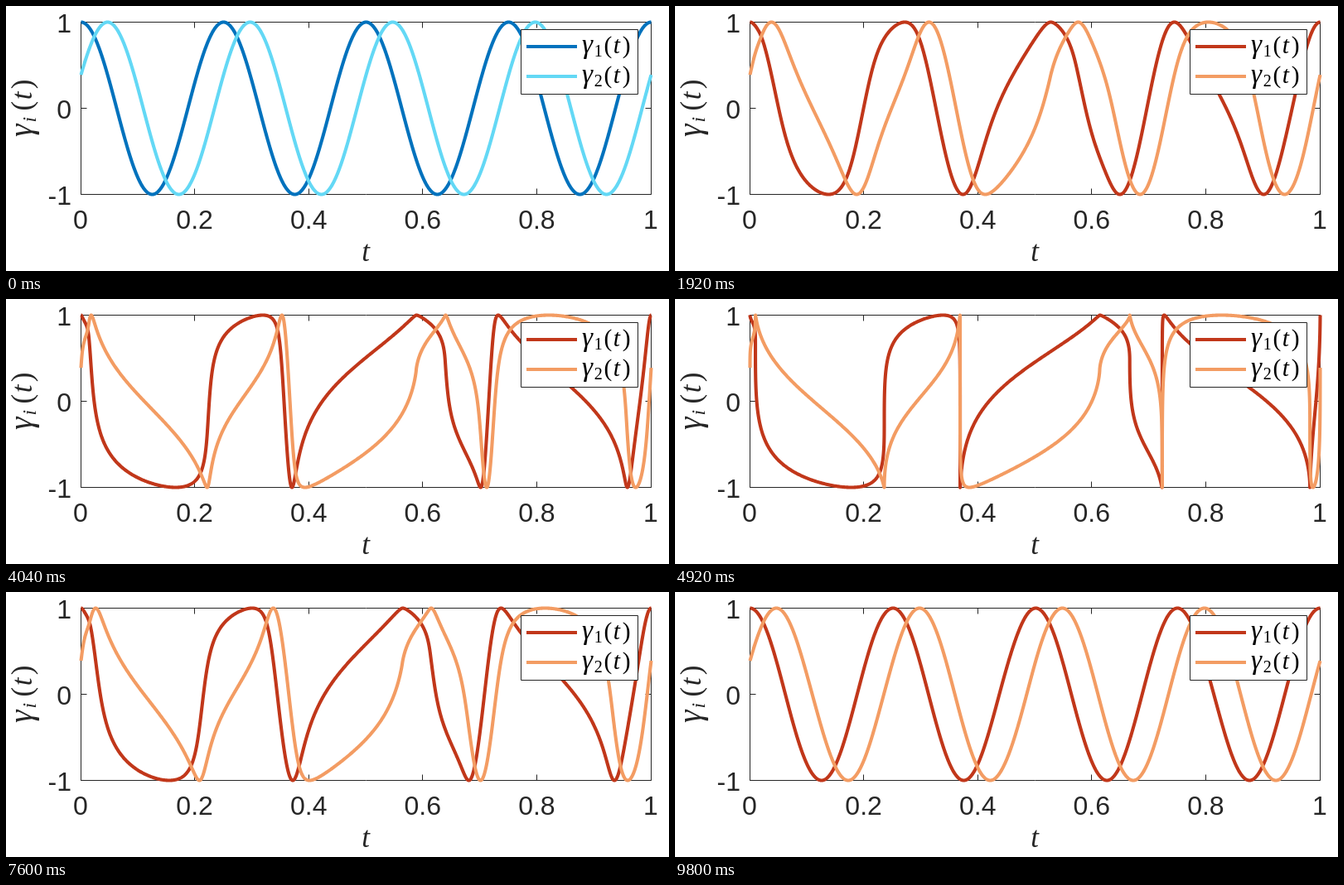
These frames come from a looping animation (800 by 320 pixels, 9840 ms). An HTML page with a canvas:

```html
<!DOCTYPE html>
<html lang="en">
<head>
<meta charset="utf-8">
<title>Time warping of two waves</title>
<style>
  html, body { margin: 0; width: 800px; height: 320px; overflow: hidden; background: #fff; }
  canvas { display: block; }
</style>
</head>
<body>
<canvas id="stage" width="800" height="320"></canvas>
<script>
const ctx = document.getElementById('stage').getContext('2d');
const LOOP = 9840, STEP = 40, HOLD = 1000, LAST = 99;
const BOX = { x: 90.5, y: 19.5, w: 688, h: 208 };
const INK = '#262626';
const BLUE = ['#0072bd', '#63d8f5'];
const RED = ['#c1371a', '#f39c63'];
const SHIFT = 1.172;
const SAMPLES = 2400;
const WEIGHT = 4.1;
const SANS = '"Liberation Sans", Arial, sans-serif';
const SERIF = '"Liberation Serif", "Times New Roman", serif';

// Places where the warped time almost stands still; a higher power is flatter.
const STOPS = [
  { s: 0, t: 0, power: 2.6 },
  { s: 0.036, t: 0.0095, power: 3.05 },
  { s: 0.1775, t: 0.2355, power: 2.5 },
  { s: 0.34, t: 0.3685, power: 5.5 },
  { s: 0.499, t: 0.6133, power: 1.42 },
  { s: 0.543, t: 0.666, power: 2.1 },
  { s: 0.672, t: 0.723, power: 5.9 },
  { s: 0.87, t: 0.982, power: 2.35 },
  { s: 1, t: 1, power: 2.6 }
];

// Full warp: an S-curve from each stop to the next.
function warp(s) {
  const next = Math.max(1, STOPS.findIndex(stop => stop.s >= s));
  const a = STOPS[next - 1], b = STOPS[next];
  const u = (s - a.s) / (b.s - a.s);
  const rise = u ** a.power, rest = (1 - u) ** b.power;
  return a.t + (b.t - a.t) * rise / (rise + rest);
}

const phases = Array.from({ length: SAMPLES + 1 }, (_, i) => i / SAMPLES);
const warped = phases.map(warp);

function poseAt(ms) {
  if (ms < HOLD) return 0;
  const back = HOLD + (LAST - 1) * STEP + HOLD;
  if (ms < back) return Math.min(LAST, 1 + Math.floor((ms - HOLD) / STEP));
  return Math.max(1, LAST - 1 - Math.floor((ms - back) / STEP));
}

function line(x1, y1, x2, y2) {
  ctx.beginPath();
  ctx.moveTo(x1, y1);
  ctx.lineTo(x2, y2);
  ctx.stroke();
}

function text(str, x, y, font, align = 'left') {
  ctx.font = font;
  ctx.textAlign = align;
  ctx.fillText(str, x, y);
}

// Writes gamma with an index and its argument from the current origin.
function gamma(index, size) {
  const italic = `italic ${size}px ${SERIF}`, upright = `${size}px ${SERIF}`;
  const slant = index === 'i' ? 'italic ' : '';
  text('γ', 0, 0, `italic ${size * 1.12}px ${SERIF}`);
  text(index, size * 0.5, size * 0.15, `${slant}${size * 0.68}px ${SERIF}`);
  text('(', size * 0.9, 0, upright);
  text('t', size * 1.28, 0, italic);
  text(')', size * 1.65, 0, upright);
}

function drawAxes() {
  const { x, y, w, h } = BOX;
  const digits = '32px ' + SANS;
  ctx.strokeStyle = ctx.fillStyle = INK;
  ctx.lineWidth = 1;
  ctx.strokeRect(x, y, w, h);
  for (let i = 0; i <= 5; i++) {
    const mark = x - 0.5 + w * i / 5, px = Math.floor(mark) + 0.5;
    line(px, y, px, y + 7);
    line(px, y + h, px, y + h - 7);
    text(String(i / 5), mark, 268.5, digits, 'center');
  }
  for (let i = -1; i <= 1; i++) {
    const py = y + h * (1 - i) / 2;
    line(x, py, x + 7, py);
    line(x + w, py, x + w - 7, py);
    text(String(i), 79, py + 12, digits, 'right');
  }
  text('t', 434, 307.5, 'italic 35px ' + SERIF, 'center');
  ctx.save();
  ctx.translate(31, 158);
  ctx.rotate(-Math.PI / 2);
  gamma('i', 35);
  ctx.restore();
}

function drawWave(mix, delay, color) {
  ctx.strokeStyle = color;
  ctx.lineWidth = WEIGHT;
  ctx.lineJoin = 'round';
  ctx.beginPath();
  phases.forEach((s, i) => {
    const t = s + mix * (warped[i] - s);
    const value = Math.cos(8 * Math.PI * s - delay);
    ctx.lineTo(BOX.x + BOX.w * t, BOX.y + BOX.h * (1 - value) / 2);
  });
  ctx.stroke();
}

function drawLegend(colors) {
  ctx.fillStyle = '#fff';
  ctx.fillRect(621.5, 28.5, 141, 78);
  ctx.strokeStyle = INK;
  ctx.lineWidth = 1;
  ctx.strokeRect(621.5, 28.5, 141, 78);
  colors.forEach((color, i) => {
    const y = 49 + 36 * i;
    ctx.strokeStyle = color;
    ctx.lineWidth = WEIGHT;
    line(628, y, 689, y);
    ctx.fillStyle = '#000';
    ctx.save();
    ctx.translate(695, y + 8);
    gamma(String(i + 1), 29.5);
    ctx.restore();
  });
}

function frame(ms) {
  const pose = poseAt(ms % LOOP);
  const colors = pose ? RED : BLUE;
  ctx.fillStyle = '#fff';
  ctx.fillRect(0, 0, 800, 320);
  drawAxes();
  drawWave(pose / LAST, 0, colors[0]);
  drawWave(pose / LAST, SHIFT, colors[1]);
  drawLegend(colors);
}

const start = performance.now();
function tick() {
  frame(performance.now() - start);
  requestAnimationFrame(tick);
}
tick();
</script>
</body>
</html>
```
